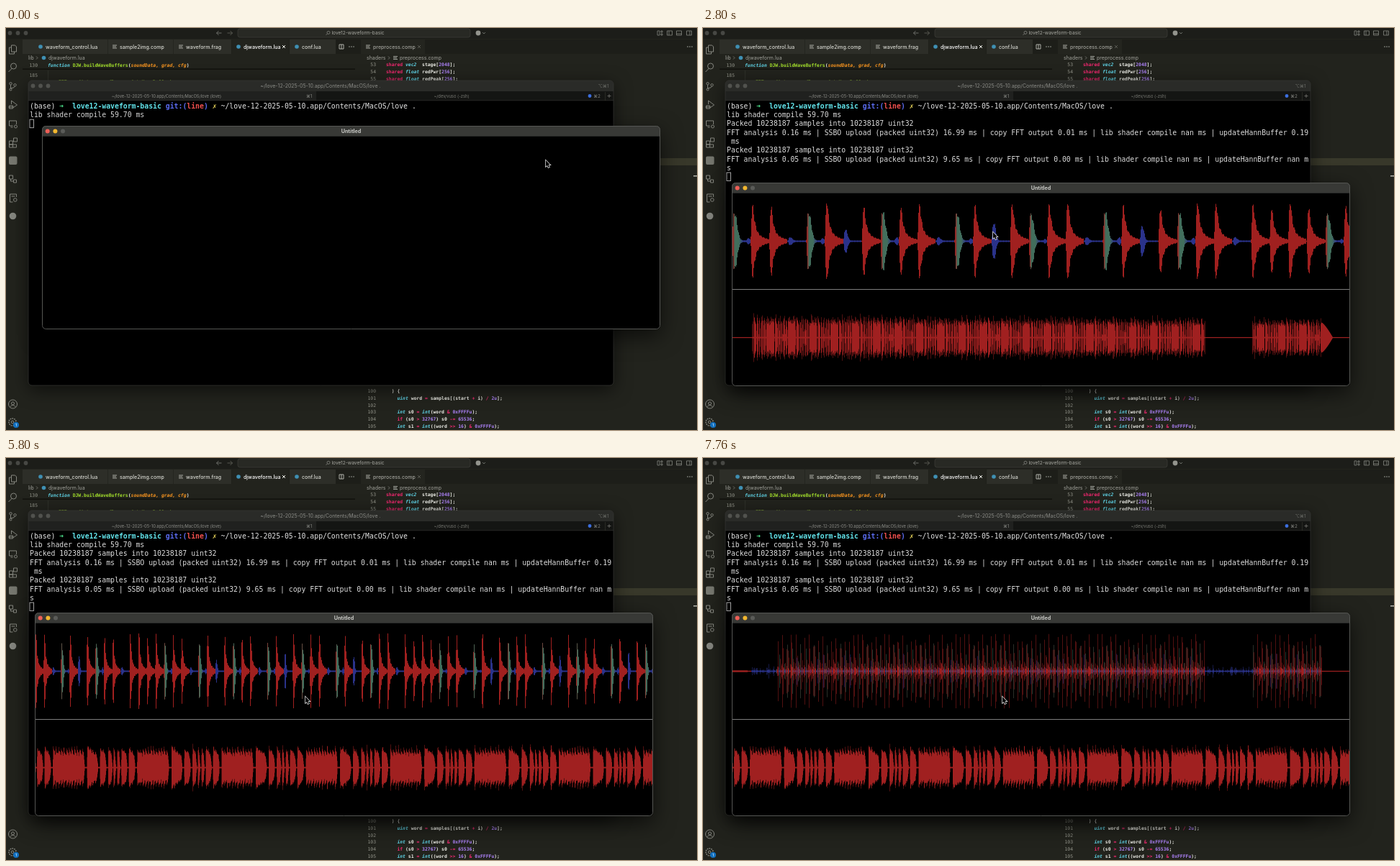
Animation, 960 px wide and 559 px high, one loop 8000 ms. Source, as an HTML page with a canvas:

```html
<!DOCTYPE html>
<html lang="en">
<head>
<meta charset="utf-8">
<title>Waveform viewer</title>
<style>
  html, body { margin: 0; width: 100%; height: 100%; overflow: hidden; background: #22231d; }
  canvas { display: block; width: 960px; height: 559px; }
</style>
</head>
<body>
<canvas id="stage" width="960" height="559"></canvas>
<script>
const LOOP = 8000, STEP = 40, LOADED = 320;
const SANS = 'Inter, "DejaVu Sans", sans-serif';
const MONO = '"DejaVu Sans Mono", monospace';
const stage = document.getElementById('stage').getContext('2d');
const backdrop = document.createElement('canvas');
backdrop.width = 960;
backdrop.height = 559;
let g = stage;

const clamp = (v, a, b) => Math.min(b, Math.max(a, v));
const smooth = v => { v = clamp(v, 0, 1); return v * v * (3 - 2 * v); };
const bump = (v, mid, width) => Math.exp(-(((v - mid) / width) ** 2));
const hash = i => { const v = Math.sin(i * 127.1 + 11.7) * 43758.5453; return v - Math.floor(v); };
const mod = (a, b) => ((a % b) + b) % b;

// Value of a keyed track [[time, ...values], ...] at time t
function track(keys, t, ease = v => v) {
  if (t <= keys[0][0]) return keys[0].slice(1);
  for (let i = 1; i < keys.length; i++) {
    const a = keys[i - 1], b = keys[i];
    if (t <= b[0]) {
      const p = ease((t - a[0]) / (b[0] - a[0]));
      return a.slice(1).map((v, j) => v + (b[j + 1] - v) * p);
    }
  }
  return keys[keys.length - 1].slice(1);
}

// ---------- drawing helpers ----------
function rect(x, y, w, h, color) { g.fillStyle = color; g.fillRect(x, y, w, h); }

function round(x, y, w, h, r, fill, line) {
  g.beginPath();
  g.roundRect(x, y, w, h, r);
  if (fill) { g.fillStyle = fill; g.fill(); }
  if (line) { g.strokeStyle = line; g.stroke(); }
}

function dot(x, y, r, fill, line) {
  g.beginPath();
  g.arc(x, y, r, 0, 7);
  if (fill) { g.fillStyle = fill; g.fill(); }
  if (line) { g.strokeStyle = line; g.stroke(); }
}

function stroke(path, x, y, color = '#85867f', width = 1) {
  g.save();
  g.translate(x, y);
  g.strokeStyle = color;
  g.lineWidth = width;
  g.stroke(new Path2D(path));
  g.restore();
}

function text(s, x, y, size, color, { font = SANS, style = '', align = 'left' } = {}) {
  g.font = `${style} ${size}px ${font}`;
  g.fillStyle = color;
  g.textAlign = align;
  g.textBaseline = 'alphabetic';
  g.fillText(s, x, y);
}

// Colour keys: the first letter of each part picks the ink
const INK = { k: '#5fd3e6', p: '#f0286f', w: '#ecece6', n: '#ab80f5', f: '#a4e02c', o: '#fb9620' };

function code(x, y, src) {
  const w = 3.853;
  let col = 0;
  for (const part of src.split('~')) {
    const s = part.slice(1);
    text(s, x + col * w, y, 6.4, INK[part[0]], { font: MONO, style: 'ko'.includes(part[0]) ? 'italic bold' : 'bold' });
    col += s.length;
  }
}

const lineNo = (n, x, y) => text(n, x, y, 6.4, '#94958b', { font: MONO, align: 'right' });
const listIcon = (x, y) => stroke('M-3-2H3M-3 0H2M-3 2H3', x, y, '#b4b5ae', 0.9);
const luaIcon = (x, y) => dot(x, y, 2.8, '#3f90b4');

// ---------- editor behind the windows ----------
function drawEditor() {
  rect(0, 0, 960, 559, '#22231d');
  rect(0, 0, 960, 15, '#1c1d19');
  rect(23, 16, 937, 20, '#1d1e19');

  for (const x of [5.5, 16.5, 27.5]) dot(x, 7, 2.9, '#474844');
  stroke('M3.5 0H-3.5M-.5-3L-3.5 0L-.5 3', 296, 7, '#7f807b', 0.8);
  stroke('M-3.5 0H3.5M.5-3L3.5 0L.5 3', 311, 7, '#65665f', 0.8);
  g.lineWidth = 0.8;
  round(322, 1, 323, 12, 3, '#282924', '#3b3c36');
  dot(448, 6.4, 2, null, '#85867f');
  stroke('M-1.5 1.5L-3.5 3.5', 448, 6.4, '#85867f', 0.8);
  text('love12-waveform-basic', 489, 9.4, 6.6, '#a9aaa3', { align: 'center' });
  dot(656, 7, 3.4, '#93948d');
  stroke('M-2-1L0 1L2-1', 664, 7, '#85867f', 0.8);
  for (const [x, d] of [[908, 'M-3-3H0V3H-3ZM2-3H4V-1H2ZM2 1H4V3H2Z'], [922, 'M-3.5-3H3.5V3H-3.5ZM-1-3V3'],
    [935, 'M-3.5-3H3.5V3H-3.5ZM-3.5 1H3.5'], [949, 'M-3.5-3H3.5V3H-3.5ZM1-3V3']]) stroke(d, x, 7, '#85867f', 0.8);

  // Tabs
  const tabs = [[23, 118, 'waveform_control.lua', 55, 1], [141.5, 91, 'sample2img.comp', 158, 0],
    [233, 80, 'waveform.frag', 250, 0], [313.5, 80, 'djwaveform.lua', 330, 1],
    [394, 64, 'conf.lua', 411, 1], [493, 89, 'preprocess.comp', 510, 0]];
  tabs.forEach(([x, w, name, tx, lua], i) => {
    const on = i === 3;
    rect(x, 16, w, 20, on ? '#22231d' : i === 5 ? '#24251f' : '#2d2e28');
    (lua ? luaIcon : listIcon)(tx - 7, 26);
    text(name, tx, 28.7, 7, on ? '#ffffff' : i === 5 ? '#a2a39c' : '#d8d9d2', { style: '500' });
  });
  stroke('M-2-2L2 2M2-2L-2 2', 386, 26, '#f0f0ea', 1);
  stroke('M-2-2L2 2M2-2L-2 2', 574, 26, '#666760', 0.8);
  stroke('M-3-3H3V3H-3ZM0-3V3', 466, 26, '#c0c1ba', 0.9);
  for (const x of [477, 480, 483, 947, 950, 953]) dot(x, 26, 0.7, '#c0c1ba');

  // Breadcrumbs
  text('lib', 31, 44, 7, '#a2a39c');
  stroke('M-1-2L1 0L-1 2', 43, 41.5, '#85867f', 0.8);
  luaIcon(52.5, 41.5);
  text('djwaveform.lua', 59, 44, 7, '#a2a39c');
  text('shaders', 501, 44, 7, '#a2a39c');
  stroke('M-1-2L1 0L-1 2', 532, 41.5, '#85867f', 0.8);
  listIcon(541, 41.5);
  text('preprocess.comp', 547, 44, 7, '#a2a39c');

  // Code
  lineNo('130', 44, 54);
  code(58, 54, 'kfunction~w ~fDJW.buildWaveBuffers~w(~osoundData, grad, cfg~w)');
  rect(23, 56.5, 462, 1.3, '#0f100c');
  lineNo('185', 44, 68);
  rect(58, 59, 0.6, 14, '#3a3b34');
  code(73, 77, 'fFFT.send(stage, redPwr, updateHannBuffer)');

  lineNo('53', 514, 53.4);
  code(528, 53.4, 'pshared~w ~kvec2~w  stage[~n2048~w];');
  lineNo('54', 514, 63.1);
  code(528, 63.1, 'pshared~w ~kfloat~w redPwr[~n256~w];');
  lineNo('55', 514, 72.8);
  code(528, 72.8, 'pshared~w ~kfloat~w redPeak[~n256~w];');

  const body = ['w  ) {', 'w    ~kuint~w word ~p=~w samples[(start ~p+~w i) ~p/~w ~n2u~w];', '',
    'w    ~kint~w s0 ~p=~w ~kint~w(word ~p&~w ~n0xFFFFu~w);',
    'w    ~pif~w (s0 ~p>~w ~n32767~w) s0 ~p-=~w ~n65536~w;',
    'w    ~kint~w s1 ~p=~w ~kint~w((word ~p>>~w ~n16~w) ~p&~w ~n0xFFFFu~w);'];
  body.forEach((src, i) => {
    const y = 507.2 + i * 9.7;
    lineNo(100 + i, 514, y);
    if (src) code(528, y, src);
  });
  rect(844, 181, 116, 10, '#38382a');
  rect(955, 205, 5, 1.5, '#b5b6ad');

  // Activity bar
  const icons = [[30, 'M-2-6H3L5-4V3H-2ZM-2-3H-5V6H2V3'], [55, 'M-1 1L-6 6M5-2A4 4 0 1 1-3-2A4 4 0 1 1 5-2'],
    [81, 'M-3-2V3M-3-2A1.7 1.7 0 1 1-3-5.4A1.7 1.7 0 1 1-3-2M-3 6A1.5 1.5 0 1 1-3 3A1.5 1.5 0 1 1-3 6M3 0A1.7 1.7 0 1 1 3-3.4A1.7 1.7 0 1 1 3 0Q3 2-3 3'],
    [107, 'M-2-1V-6L6 0L0 4M-5 1H0V5H-5ZM-6 3H1'], [133, 'M-5-4H5V1M0 3H-5V-4M-3 5H0M2 4A2 2 0 1 1 6 4A2 2 0 1 1 2 4'],
    [159, 'M-5-2H0V3H-5ZM-5 3H0V7H-5ZM0 3H5V7H0ZM1-6H6V-1H1Z'],
    [210, 'M-5-5H0V0H-5ZM1 1H5V5H1ZM-3 0V3H1'], [236, 'M5-1V-5H-4V6H0M-2-2H3M1 3A2.3 2.3 0 1 1 5.6 3A2.3 2.3 0 1 1 1 3'],
    [523, 'M6 0A6 6 0 1 1-6 0A6 6 0 1 1 6 0M2-1A2 2 0 1 1-2-1A2 2 0 1 1 2-1M-4 4Q0-1 4 4']];
  for (const [y, d] of icons) stroke(d, 9.5, y);
  round(4, 178.5, 11.5, 11.5, 2, '#777870');
  dot(9.5, 261.5, 4.8, '#85867f');
  g.setLineDash([1.6, 1.2]);
  g.lineWidth = 1.6;
  dot(9, 548, 5, null, '#85867f');
  g.setLineDash([]);
  g.lineWidth = 1;
  dot(9, 548, 1.8, null, '#85867f');
  dot(14, 552, 4, '#1270c0');
  text('1', 14, 554, 5.4, '#fff', { align: 'center' });

  drawTerminalFrame();
}

function shadow(blur, dy, alpha) {
  g.shadowColor = `rgba(0,0,0,${alpha})`;
  g.shadowBlur = blur;
  g.shadowOffsetY = dy;
}

function drawTerminalFrame() {
  g.save();
  shadow(24, 6, 0.6);
  round(31, 73, 813, 424, 5, '#000');
  g.restore();
  round(31, 73, 813, 15, [5, 5, 0, 0], '#2a2b28');
  rect(31, 88, 400, 13, '#20211f');
  rect(431, 88, 413, 13, '#141513');
  rect(31, 100.5, 813, 0.7, '#2e2f2c');
  g.lineWidth = 0.7;
  round(31, 73, 813, 424, 5, null, '#383935');
  for (const x of [37.5, 48, 58.5]) dot(x, 80.5, 2.9, '#51524e');
  text('~/love-12-2025-05-10.app/Contents/MacOS/love .', 437, 83, 7, '#8b8c87', { align: 'center' });
  text('⌥⌘1', 830, 82.5, 6.2, '#6d6e69', { align: 'center' });
  text('~/love-12-2025-05-10.app/Contents/MacOS/love (love)', 223, 97, 5.8, '#8b8c87', { align: 'center' });
  text('~/dev/vuso (-zsh)', 619, 97, 5.8, '#777872', { align: 'center' });
  text('⌘1', 421, 97, 5.8, '#8b8c87', { align: 'center' });
  text('⌘2', 821, 97, 5.8, '#8b8c87', { align: 'center' });
  dot(811, 94.5, 2.4, '#3c6fe0');
  rect(832, 89, 0.7, 12, '#33342f');
  stroke('M-2.5 0H2.5M0-2.5V2.5', 838, 94.5, '#777872', 0.8);
}

// ---------- terminal ----------
const ROW = 12.3, CHAR = 5.9;
const PROMPT = [[0, '(base)', '#e4e4e4'], [7, '➜', '#4be08a', 1], [10, 'love12-waveform-basic', '#62e3ea', 1],
  [32, 'git:(', '#5b6cf0', 1], [37, 'line', '#f0504e', 1], [41, ')', '#5b6cf0', 1], [43, '✗', '#e8d45a', 1],
  [45, '~/love-12-2025-05-10.app/Contents/MacOS/love .', '#e4e4e4']];
const packed = 'Packed 10238187 samples into 10238187 uint32';
const report = (a, b, c, d) => `FFT analysis ${a} ms | SSBO upload (packed uint32) ${b} ms | copy FFT output ${c} ms | lib shader compile nan ms | updateHannBuffer ${d}`;
const OUTPUT = ['lib shader compile 59.70 ms', packed, report('0.16', '16.99', '0.01', '0.19'), ' ms',
  packed, report('0.05', '9.65', '0.00', 'nan m'), 's'];

function drawTerminal(loaded) {
  for (const [col, s, color, bold] of PROMPT)
    text(s, 33 + col * CHAR, 111.8, 9.8, color, { font: MONO, style: bold ? 'bold' : '' });
  const lines = loaded ? OUTPUT : OUTPUT.slice(0, 1);
  lines.forEach((s, i) => text(s, 33, 111.8 + (i + 1) * ROW, 9.8, '#dcdcdc', { font: MONO }));
  g.lineWidth = 0.9;
  g.strokeStyle = '#b8b8b8';
  g.strokeRect(33, 102.6 + (lines.length + 1) * ROW, 5.5, 11.5);
}

// ---------- audio model, u counts half beats ----------
const W = 859, H = 283, FULL = 0.925;
const RED = [160, 32, 31], GREEN = [66, 110, 92], BLUE = [42, 50, 138];
const mix = (a, b, p) => a.map((v, i) => v + (b[i] - v) * clamp(p, 0, 1));
const isMain = u => (u > 67 && u < 711) || (u > 782 && u < 886);

function drums(u) {
  if (u < 29) return [u < 24 ? 1.2 : 0.7, RED];
  if (u > 886) return [0.6, RED];
  const v = u - 4.37, i = Math.floor(v), d = v - i, r = hash(i);
  if (!isMain(u)) return [0.6 + (u < 70 ? 15 : 11) * r * r * Math.exp(-d * 3), BLUE];
  const fill = mod(Math.floor(i / 8), 4) === 2;
  const kind = (fill ? 'RRtRRRRG' : 'RRtGRBRG')[mod(i, 8)];
  const rise = smooth(d / 0.1), e = Math.max(0, d - 0.15);
  const ripple = 1 + 0.12 * Math.sin(d * 42 + r * 6) * smooth(d * 4);
  let a, c = RED;
  if (kind === 'R') {
    a = (43 + 11 * r) * (0.68 * Math.exp(-e / 0.11) + 0.32 * Math.exp(-e / 0.5));
  } else if (kind === 'G') {
    a = (33 + 6 * r) * bump(e, 0, 0.19) + 1.2 + 5 * r * bump(d, 0.9, 0.08);
    c = mix(mix(RED, GREEN, (d - 0.05) / 0.12), BLUE, (d - 0.38) / 0.25);
  } else if (kind === 'B') {
    a = (14 + 10 * r) * bump(e, 0, 0.13) + 1;
    c = BLUE;
  } else {
    a = 1 + 4.5 * bump(d, 0.14, 0.16);
    c = BLUE;
  }
  return [Math.max(0.8, a * rise * ripple), c];
}

const NOTES = [[0, 12.1], [13, 17.2], [17.9, 20.3], [21, 22.7], [23, 24], [24.4, 25.6], [26, 28.3], [28.8, 31.3]];

function bass(u) {
  if (u > 886 && u < 903) return [Math.max(0.6, 21 * (1 - ((u - 886) / 17) ** 1.3)), RED];
  if (!(u > 31 && u < 711) && !(u > 782 && u < 887)) return [0.6, RED];
  const w = mod(u - 20, 32), n = NOTES.findIndex(([a, b]) => w >= a && w < b);
  if (n < 0) return [1, RED];
  const [a, b] = NOTES[n], p = w % 1;
  const edge = Math.min(1, 0.4 + (w - a) / 0.25, 0.2 + (b - w) / 0.5);
  const body = n ? 28 - 13 * (w - a) / (b - a) : 26 - 7 * p - (p < 0.12 ? 9 : 0);
  const kick = 6 * hash(Math.floor(u)) * bump(p, 0.2, 0.12);
  const grain = 1 + 0.2 * (hash(Math.floor(u * 5)) - 0.5);
  return [(body + kick) * edge * grain * (1.06 - 0.16 * u / 886), RED];
}

// Overlapping slices add up, so a fully covered column keeps its colour
function drawWave(wave, cy, s, x0) {
  const dx = s < 4 ? 0.5 : 1;
  x0 = clamp(x0, W - W / FULL * s, 0);
  g.globalCompositeOperation = 'lighter';
  for (let x = 0; x < W; x += dx) {
    const [a, c] = wave((x + dx / 2 - x0) / s);
    g.fillStyle = `rgb(${c.map(Math.round)})`;
    g.fillRect(x, cy - a, dx, 2 * a);
  }
  g.globalCompositeOperation = 'source-over';
}

// ---------- motion ----------
const WINDOW = [[1120, 50, 136], [1200, 47, 162], [1280, 41, 194], [1400, 40, 215]];
const POINTER = [[600, 750, 184], [920, 721, 148], [1120, 721, 148], [1280, 712, 210], [1400, 710, 227],
  [1560, 710, 227], [2040, 403, 284], [3600, 403, 284], [3920, 681, 299], [4000, 681, 301], [4340, 391, 380],
  [4400, 395, 403], [4440, 413, 442], [5480, 413, 442], [5600, 416, 332]];
const PAN = [[3600, 404], [3920, 682], [4000, 682], [4340, 391.2]];
const logKeys = keys => keys.map(([t, s]) => [t, Math.log(s)]);
const TOP = logKeys([[2480, FULL], [2800, 25.75], [2960, 48], [3080, 48], [3440, 10.48], [5760, 10.48],
  [6360, 73.4], [6520, 105], [6640, 105], [7360, 2.6], [7440, 2.6], [7760, FULL]]);
const LOW = logKeys([[4680, FULL], [4880, 9.72], [5040, 24], [5140, 24], [5480, 3.66]]);

function drawWindow(t) {
  const [wx, wy] = track(WINDOW, t).map(Math.round);
  g.save();
  g.translate(wx, wy);
  g.save();
  shadow(30, 9, 0.65);
  round(0, 0, W, H, 5, '#000');
  g.restore();
  g.save();
  g.beginPath();
  g.roundRect(0, 0, W, H, 5);
  g.clip();
  rect(0, 0, W, 15, '#383936');
  rect(0, 14.4, W, 0.6, '#1c1c1b');
  if (t >= LOADED) {
    const top = Math.exp(track(TOP, t)[0]), low = Math.exp(track(LOW, t)[0]);
    const [au, ax] = t < 5760 ? [393.5, track(PAN, t, smooth)[0]] : [395.87, 416];
    drawWave(drums, 81.5, top, ax - 40 - au * top);
    drawWave(bass, 215.5, low, 373.5 - 403.2 * low);
    rect(0, 148, W, 1, '#7c7c7c');
  }
  g.restore();
  g.lineWidth = 1;
  round(0.5, 0.5, W - 1, H - 1, 5, null, '#555653');
  dot(7.7, 7.5, 3, '#ee5f57');
  dot(18.4, 7.5, 3, '#f2b72f');
  dot(29, 7.5, 3, '#5a5b58');
  text('Untitled', W / 2, 10, 7.2, '#c9cac6', { style: 'bold', align: 'center' });
  g.restore();
}

const ARROW = new Path2D('M0 0V8.6L2 6.9L3.4 10L4.9 9.3L3.6 6.3H6Z');

function drawPointer(t) {
  const [x, y] = track(POINTER, t, smooth);
  g.save();
  g.translate(x, y);
  g.lineWidth = 1.5;
  g.strokeStyle = '#e6e6e6';
  g.stroke(ARROW);
  g.fillStyle = '#000';
  g.fill(ARROW);
  g.restore();
}

function frame(now) {
  const t = Math.floor((now % LOOP) / STEP) * STEP;
  g.drawImage(backdrop, 0, 0);
  drawTerminal(t >= LOADED);
  drawWindow(t);
  drawPointer(t);
  requestAnimationFrame(() => frame(performance.now()));
}

g = backdrop.getContext('2d');
drawEditor();
g = stage;
frame(performance.now());
</script>
</body>
</html>
```
